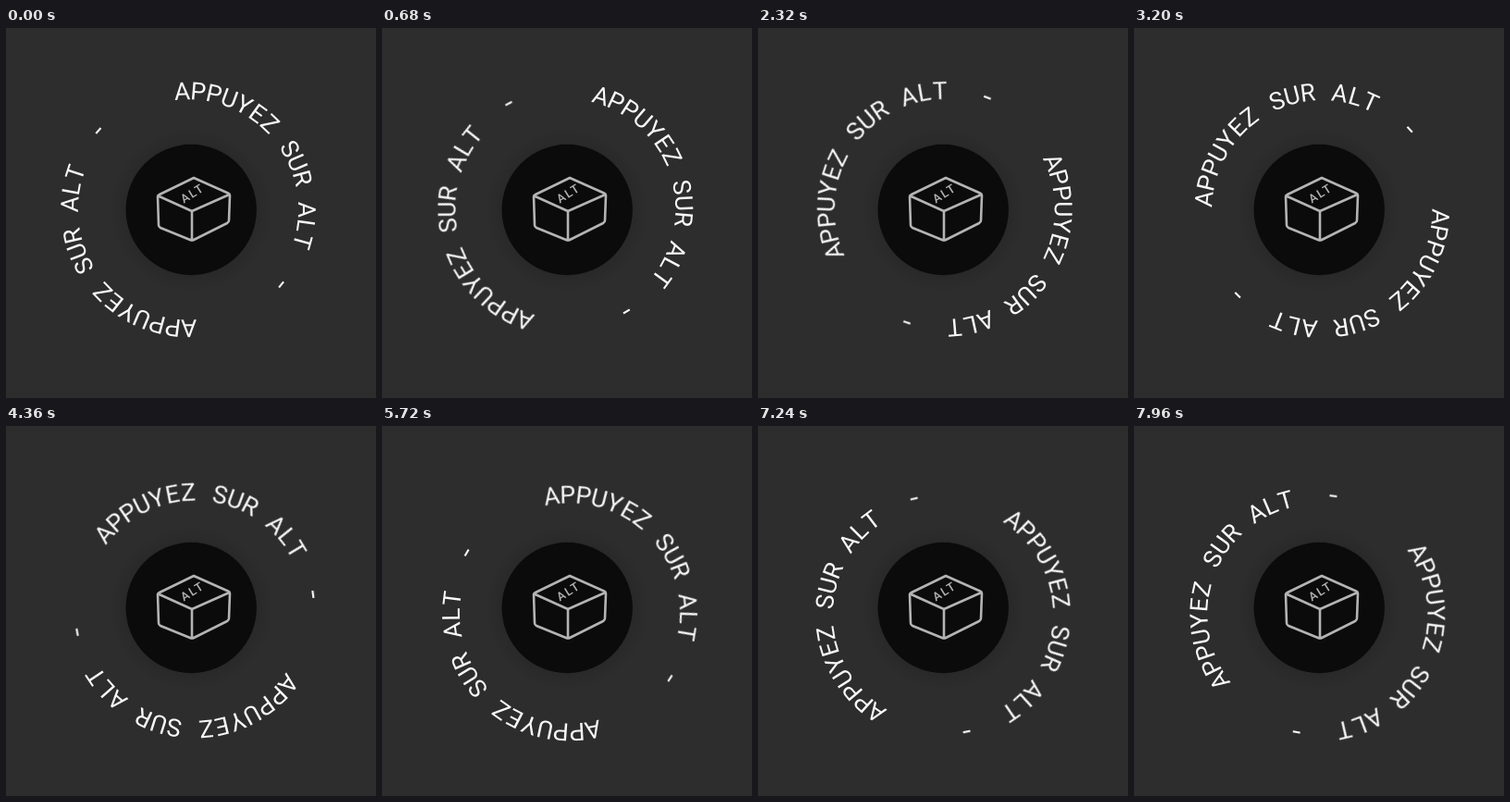
These frames come from a looping animation (400 by 400 pixels, 8 s). An HTML page:

```html
<!DOCTYPE html>
<html lang="fr">
<head>
<meta charset="utf-8">
<title>Appuyez sur Alt</title>
<style>
  html, body { margin: 0; width: 100%; height: 100%; overflow: hidden; background: #2d2d2d; }
  svg { display: block; width: 100%; height: 100%; }
  text { text-anchor: middle; }
  #ring { font: 400 26.5px Roboto, sans-serif; fill: #f8f8f8; }
  #ring .dash { font-family: "Noto Sans Mono", monospace; }
  .key { font: 500 13px Roboto, sans-serif; fill: #b4b4b4; letter-spacing: 1.8px; }
</style>
</head>
<body>
<svg viewBox="0 0 400 400">
  <defs>
    <radialGradient id="glow">
      <stop offset=".78" stop-color="#000" stop-opacity=".1"/>
      <stop offset="1" stop-color="#000" stop-opacity="0"/>
    </radialGradient>
    <filter id="soft"><feGaussianBlur stdDeviation=".6"/></filter>
    <filter id="softText"><feGaussianBlur stdDeviation=".35"/></filter>
  </defs>
  <rect width="400" height="400" fill="#2d2d2d"/>
  <circle cx="200" cy="197" r="89" fill="url(#glow)"/>
  <g filter="url(#soft)">
    <circle cx="200.2" cy="196.5" r="70.7" fill="#0b0b0b"/>
    <path d="M203 162 L240 178.500 Q242 179.500 242 181 L241 208 Q241 210 239 211 L203 229 Q201 230 199 229 L167 216 Q165 215 165 213 L164 182 Q164 181 166 180 Z
             M164.500 181.500 L201 198 L241.500 180 M201 198 V229.500"
          fill="none" stroke="#b4b4b4" stroke-width="2.600" stroke-linejoin="round"/>
    <text class="key" transform="translate(204 182.500) rotate(-32)">ALT</text>
  </g>
  <g filter="url(#softText)"><g id="ring"></g></g>
</svg>
<script>
  const LOOP = 8000, STEP = 40, SPEED = 0.03;   // ms, ms, degrees per ms
  const PIVOT = [199.7, 199.6];
  const OFFSET = [-2.8, -3.3];                  // ring centre relative to the pivot
  const BASELINE = 119, PITCH = 7.75;           // px, degrees per character
  const STARTS = [-2.9, 179.6];
  const PHRASE = "APPUYEZ SUR ALT  -";
  const ring = document.getElementById("ring");

  function addChar(char, angle) {
    const node = document.createElementNS(ring.namespaceURI, "text");
    const isDash = char === "-";
    const radius = BASELINE + (isDash ? 3 : 0);
    node.textContent = char;
    if (isDash) node.setAttribute("class", "dash");
    node.setAttribute("transform",
      `translate(${OFFSET}) rotate(${angle}) translate(0 ${-radius})`);
    ring.append(node);
  }

  for (const start of STARTS) {
    [...PHRASE].forEach((char, i) => {
      if (char !== " ") addChar(char, start + i * PITCH);
    });
  }

  function draw(ms) {
    const time = Math.floor((ms % LOOP) / STEP) * STEP;
    ring.setAttribute("transform", `translate(${PIVOT}) rotate(${time * SPEED})`);
  }

  let origin;
  function tick(now) {
    origin ??= now;
    draw(now - origin);
    requestAnimationFrame(tick);
  }
  draw(0);
  requestAnimationFrame(tick);
</script>
</body>
</html>
```
